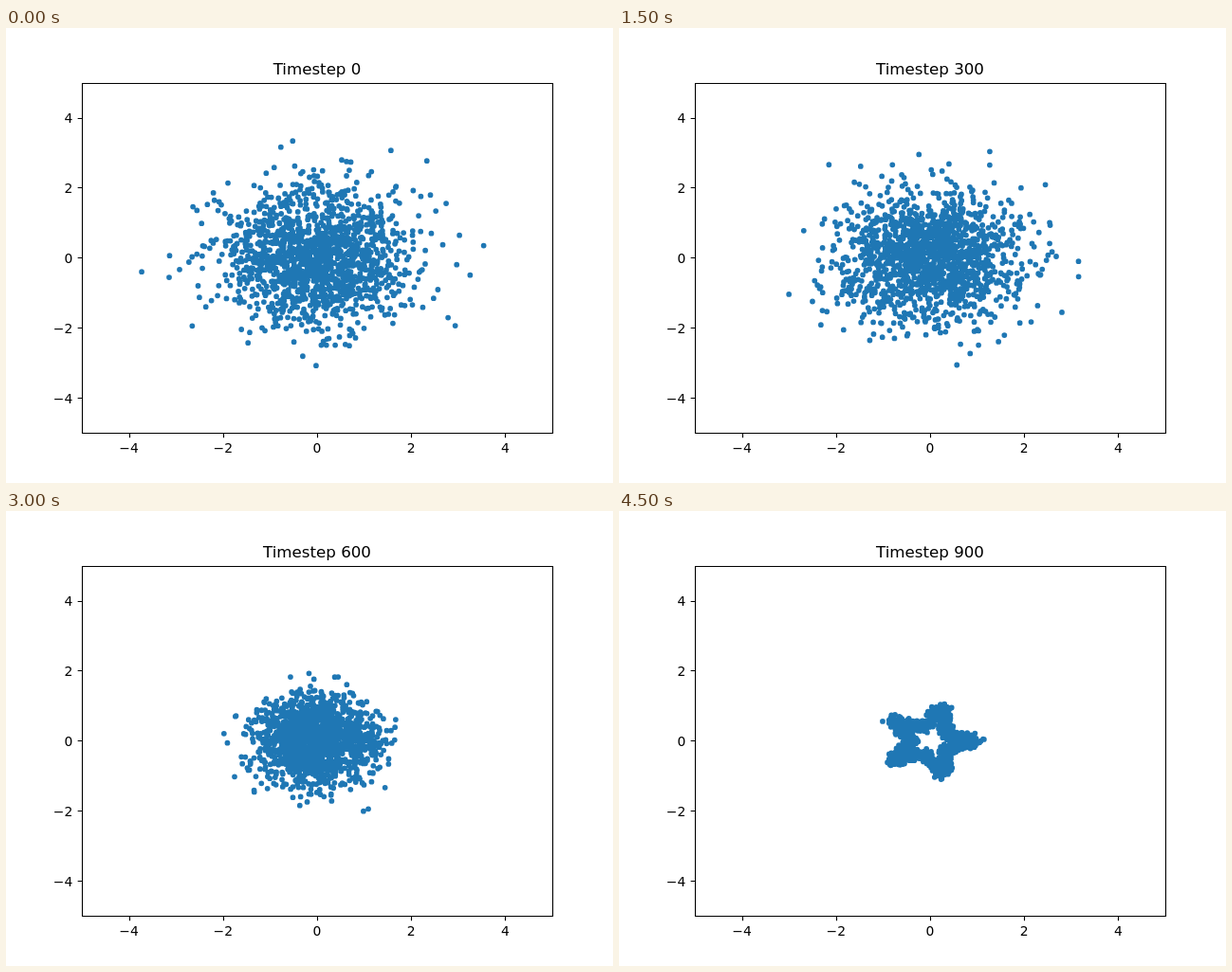
An HTML page for the animation above (5 s loop, 640 by 480 pixels).

```html
<!DOCTYPE html>
<html lang="en">
<head>
<meta charset="utf-8">
<style>
  html, body { margin: 0; width: 100%; height: 100%; overflow: hidden; background: #fff; }
  svg { display: block; font: 13.89px "DejaVu Sans", sans-serif; }
  #title { font-size: 16.67px; text-anchor: middle; }
  #axes { fill: none; stroke: #000; stroke-width: 1.11; }
  #dots { fill: none; stroke: #1f77b4; stroke-width: 5.78; stroke-linecap: round; }
</style>
</head>
<body>
<svg width="640" height="480" viewBox="0 0 640 480">
  <path id="dots"/>
  <path id="axes"/>
  <g id="labels"></g>
  <text id="title" x="328" y="49"></text>
</svg>
<script>
const COUNT = 1500, STEPS = 10, STEP_MS = 500;
const $ = id => document.getElementById(id);
const px = x => 328 + 49.6 * x;
const py = y => 242.4 - 36.96 * y;

function seededRandom(seed) {
  return () => {
    seed = (seed + 0x6d2b79f5) | 0;
    let t = Math.imul(seed ^ (seed >>> 15), 1 | seed);
    t = (t + Math.imul(t ^ (t >>> 7), 61 | t)) ^ t;
    return ((t ^ (t >>> 14)) >>> 0) / 4294967296;
  };
}

function starVertex(k) {
  const radius = k % 2 ? 0.4 : 1, angle = k * Math.PI / 5;
  return [radius * Math.cos(angle), radius * Math.sin(angle)];
}

// Point on the star's outline, u from 0 to 1
function starPoint(u) {
  const k = Math.floor(u * 10), f = u * 10 - k;
  const a = starVertex(k), b = starVertex(k + 1);
  return [a[0] + (b[0] - a[0]) * f, a[1] + (b[1] - a[1]) * f];
}

// Share of the variance that is noise, from the integral of a sigmoid schedule
function noisePower(step) {
  const softplus = x => Math.log(1 + Math.exp(x));
  const remaining = 1 - step / STEPS;
  return 1 - Math.exp(-(softplus(12 * remaining - 6) - softplus(-6)) / 1.2);
}

// Each cloud blends the star with fresh Gaussian noise.
function cloudPath(step) {
  const random = seededRandom(step * 977 + 5);
  const power = noisePower(step);
  const signal = Math.sqrt(1 - power), sigma = Math.sqrt(power);
  let path = "";
  for (let i = 0; i < COUNT; i++) {
    const [x, y] = starPoint(random());
    const r = sigma * Math.sqrt(-2 * Math.log(1 - random()));
    const angle = 2 * Math.PI * random();
    const cx = px(signal * x + r * Math.cos(angle));
    const cy = py(signal * y + r * Math.sin(angle));
    path += `M${cx.toFixed(2)} ${cy.toFixed(2)}h0.001`;
  }
  return path;
}

function addLabel(value, x, y, anchor) {
  const label = document.createElementNS("http://www.w3.org/2000/svg", "text");
  label.textContent = String(value).replace("-", "\u2212");
  label.setAttribute("x", x);
  label.setAttribute("y", y);
  label.setAttribute("text-anchor", anchor);
  $("labels").append(label);
}

function drawAxes() {
  const snap = v => Math.round(v) + 0.5;
  let path = "M80.5 58.5H576.5V427.5H80.5Z";
  for (let v = -4; v <= 4; v += 2) {
    path += `M${snap(px(v))} 427.5v4.86M80.5 ${snap(py(v))}h-4.86`;
    addLabel(v, px(v), 448, "middle");
    addLabel(v, 70.3, Math.round(py(v) + 5.3), "end");
  }
  $("axes").setAttribute("d", path);
}

const clouds = Array.from({ length: STEPS }, (_, step) => cloudPath(step));
let shown = -1;

function render(now) {
  const step = Math.floor(now / STEP_MS) % STEPS;
  if (step === shown) return;
  $("dots").setAttribute("d", clouds[step]);
  $("title").textContent = `Timestep ${step * 100}`;
  shown = step;
}

drawAxes();
const start = performance.now();
render(0);
requestAnimationFrame(function tick(now) {
  render(Math.max(0, now - start));
  requestAnimationFrame(tick);
});
</script>
</body>
</html>
```
